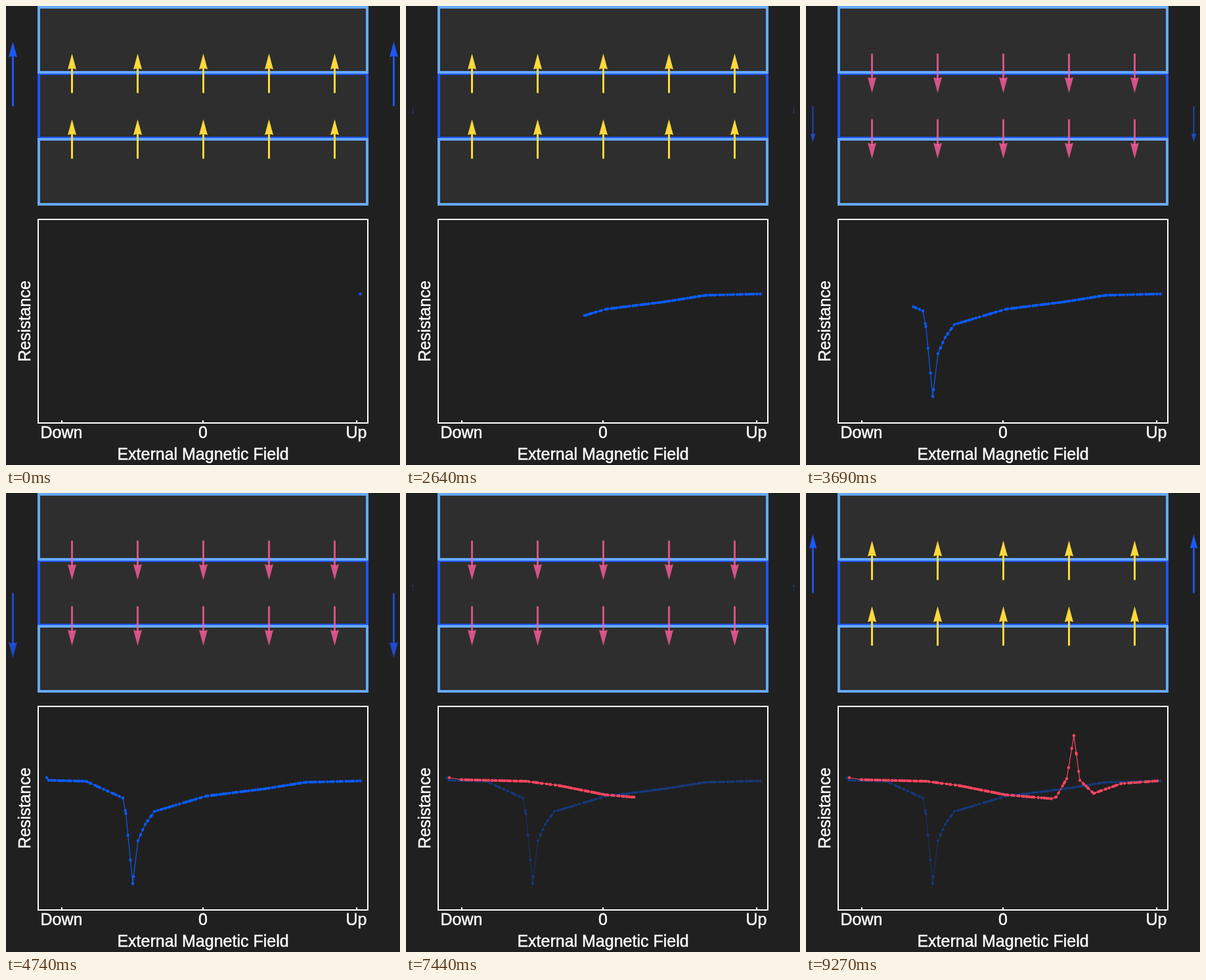
An HTML page with a canvas that plays this animation: 600x699 px, repeating every 9300 ms.

```html
<!DOCTYPE html>
<html lang="en">
<head>
<meta charset="utf-8">
<title>Resistance of a magnetic layer stack</title>
<style>
html, body { margin: 0; width: 100%; height: 100%; overflow: hidden; background: #202020; }
canvas { display: block; }
</style>
</head>
<body>
<canvas id="stage" width="600" height="699"></canvas>
<script>
const ctx = document.getElementById('stage').getContext('2d');
const STEP = 30, STEPS = 310, TURN = 158;

// Key points of each sweep: sample index, x, y
const downSweep = makeTrace([
  [0, 539.5, 438.5], [25, 456, 440.5], [48, 394, 450.5], [78, 305, 461.5],
  [102, 226, 485], [107, 212, 504.5], [111, 201, 529.5], [113, 193, 594.5],
  [116, 182.5, 488], [118, 178, 464.5], [136, 122, 439], [157, 65, 437.5], [158, 62, 433.5]
]);
const upSweep = makeTrace([
  [0, 66, 433.5], [1, 84, 436.5], [34, 183, 439], [47, 233, 445.5], [74, 303, 459.5],
  [97, 374, 465.5], [99, 381, 463], [105, 397, 435], [108, 408, 369.5],
  [112, 417, 437.5], [119, 438, 457.5], [134, 480, 442.5], [150, 535, 438.5]
]);

// Samples between key points are scattered along the line like measurements
function makeTrace(keys) {
  const points = [];
  keys.forEach(([i, x, y], k) => {
    points.push([x, y]);
    if (k + 1 === keys.length) return;
    const [j, x2, y2] = keys[k + 1];
    for (let s = i + 1; s < j; s++) {
      const noise = Math.abs(Math.sin(s * 12.9898) * 43758.5453) % 1 - 0.5;
      const u = Math.min(1, Math.max(0, (s - i + 1.5 * noise) / (j - i)));
      points.push([x + (x2 - x) * u, y + (y2 - y) * u]);
    }
  });
  return points;
}

// Eased progress from 0 to 1 over some samples
function flip(n, from, length) {
  const u = Math.min(1, Math.max(0, (n - from) / length));
  return u < 0.5 ? 4 * u ** 3 : 1 - 4 * (1 - u) ** 3;
}

function layer(y, h, color) {
  ctx.lineWidth = 4;
  ctx.strokeStyle = color;
  ctx.fillStyle = '#2e2e2e';
  ctx.fillRect(50, y, 500, h);
  ctx.strokeRect(50, y, 500, h);
}

// Upward arrow with its tail at (0, tail)
function arrow(x, y, angle, scale, tail, length, color) {
  const tip = tail - length;
  ctx.save();
  ctx.translate(x, y);
  ctx.rotate(angle);
  ctx.scale(scale, scale);
  ctx.fillStyle = color;
  ctx.fillRect(-1.5, tip + 20, 3, length - 20);
  ctx.beginPath();
  ctx.moveTo(0, tip);
  ctx.lineTo(6.5, tip + 24);
  ctx.lineTo(0, tip + 22);
  ctx.lineTo(-6.5, tip + 24);
  ctx.fill();
  ctx.restore();
}

function spins(y, turned) {
  const color = turned < 0.5 ? '#ffd83c' : '#ff5c9c';
  for (let x = 100.5; x < 550; x += 100) arrow(x, y, -Math.PI * turned, 1, 30, 60, color);
}

function trace(points, color, alpha) {
  ctx.globalAlpha = alpha;
  ctx.strokeStyle = ctx.fillStyle = color;
  ctx.lineWidth = 1.2;
  ctx.beginPath();
  points.forEach(([x, y]) => ctx.lineTo(x, y));
  ctx.stroke();
  ctx.beginPath();
  points.forEach(([x, y]) => {
    ctx.moveTo(x + 2.2, y);
    ctx.arc(x, y, 2.2, 0, 7);
  });
  ctx.fill();
  ctx.globalAlpha = 1;
}

function label(text, x, y, angle = 0) {
  ctx.save();
  ctx.translate(x, y);
  ctx.rotate(angle);
  ctx.fillText(text, 0, 0);
  ctx.lineWidth = 0.5;
  ctx.strokeText(text, 0, 0);
  ctx.restore();
}

function chart(n) {
  ctx.fillStyle = ctx.strokeStyle = '#fff';
  ctx.lineWidth = 2;
  ctx.strokeRect(49, 325, 502, 310);
  for (const x of [84, 299, 533]) ctx.fillRect(x, 631, 2, 4);
  ctx.font = '25px "Liberation Sans", Arial, sans-serif';
  ctx.textAlign = 'center';
  label('Down', 84.5, 658);
  label('0', 300, 658);
  label('Up', 533.5, 658);
  label('External Magnetic Field', 300, 691);
  label('Resistance', 36.5, 480, -Math.PI / 2);

  trace(downSweep.slice(0, n + 1), '#0a5cff', n > TURN ? 0.3 : 1);
  if (n > TURN) trace(upSweep.slice(0, n - TURN), '#ff4560', 1);
}

function draw(now) {
  const n = Math.floor(now / STEP) % STEPS;
  ctx.fillStyle = '#202020';
  ctx.fillRect(0, 0, 600, 699);

  layer(103, 98, '#2255f5');
  layer(2, 99, '#66a9ff');
  layer(203, 99, '#66a9ff');

  const upper = flip(n, 105, 8) - flip(n, 255, 8);
  const lower = flip(n, 105, 13) - flip(n, 263, 9.5);
  const field = (1.245 * Math.abs(n - TURN) - 98.5) / 100;
  ctx.globalAlpha = 1 - 0.2 * lower;
  spins(102.5, upper);
  spins(202.5, lower);
  for (const x of [10.5, 590.5]) arrow(x, 152.5, 0, field, 0, 100, '#1c58f8');
  ctx.globalAlpha = 1;

  chart(n);
}

const start = performance.now();
function tick() {
  draw(performance.now() - start);
  requestAnimationFrame(tick);
}
tick();
</script>
</body>
</html>
```
